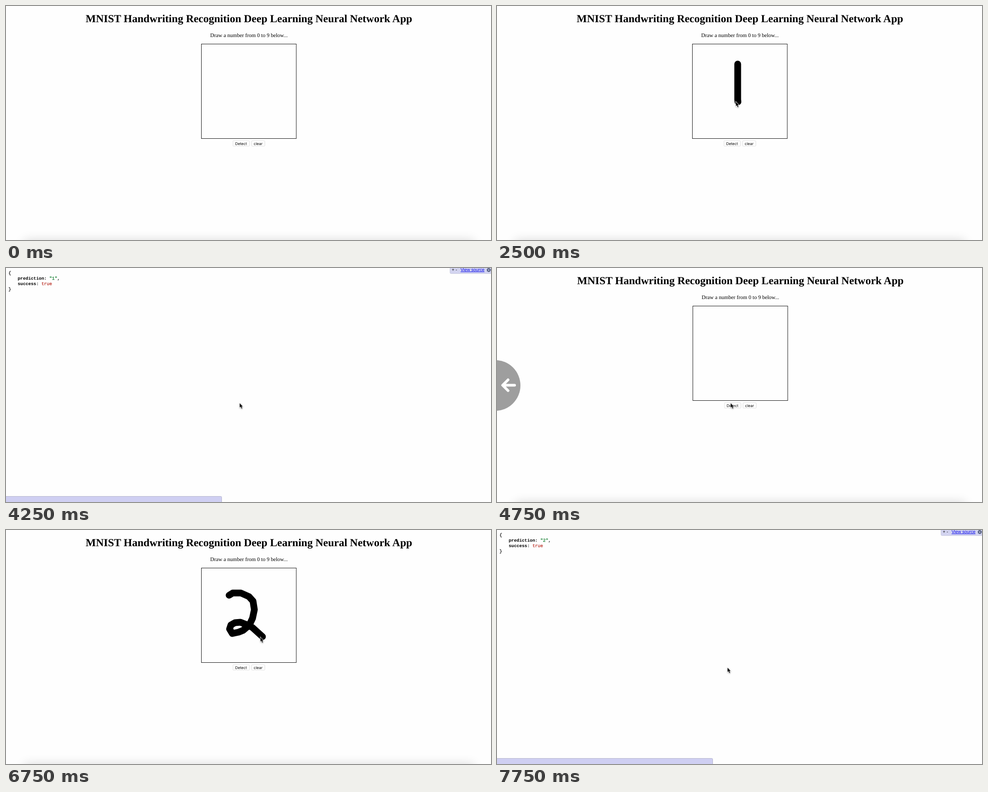
Recreate the animation shown at these times as an HTML page. Size 1076 by 520 pixels, loop 8 s.

```html
<!DOCTYPE html>
<html lang="en">
<head>
<meta charset="utf-8">
<title>Handwriting recognition demo</title>
<style>
html, body { margin: 0; width: 100%; height: 100%; overflow: hidden; background: #fefefe; }
svg { display: block; width: 1076px; height: 520px; }
text { white-space: pre; text-rendering: geometricPrecision; }

.serif { font-family: "Liberation Serif", "Times New Roman", serif; text-anchor: middle; }
.title { font-size: 24px; font-weight: bold; }
.hint { font-size: 12px; }
.label { font: 8.4px Inter, sans-serif; text-anchor: middle; }
.button { fill: #fff; stroke: #e2e2e2; stroke-width: .8; filter: drop-shadow(0 .6px .4px rgba(0, 0, 0, .22)); }
.json { font: bold 9.75px "Liberation Mono", "Courier New", monospace; }
.brace { font-weight: normal; stroke: #000; stroke-width: .25px; }
.string { fill: #0c7a2a; stroke: #0c7a2a; stroke-width: .25px; font-weight: normal; }
.bool { fill: #b92a20; stroke: #b92a20; stroke-width: .25px; font-weight: normal; }
.tools { font: 9.75px "Liberation Sans", Arial, sans-serif; }
.link { fill: #00e; text-decoration: underline; }
.ink { fill: none; stroke: #000; stroke-width: 15px; stroke-linecap: round; stroke-linejoin: round; }
.cursor { stroke: #fff; stroke-width: 1.6px; paint-order: stroke; filter: drop-shadow(0 1px .8px rgba(0, 0, 0, .3)); }

/* One slot is 250 ms = 3.125 % of the loop */
.page, .result, .first, .second, .toolbar, .back, .one, .two, .cursor {
  animation-duration: 8s;
  animation-timing-function: step-end;
  animation-iteration-count: infinite;
}
.page { animation-name: page; }
.result { animation-name: result; }
.first { animation-name: first; }
.second { animation-name: second; }
.toolbar { animation-name: toolbar; }
.back { animation-name: back; }
.one { animation-name: one; stroke-dasharray: 111 200; }
.two { animation-name: two; stroke-dasharray: 263 400; }
.cursor { animation-name: cursor; }

@keyframes page {
  0%, 62.5% { visibility: visible; transform: none; }
  50%, 93.75%, 100% { visibility: hidden; transform: none; }
  59.375% { visibility: visible; transform: translateX(1px); }
}
@keyframes result {
  0%, 59.375% { visibility: hidden; }
  50%, 93.75%, 100% { visibility: visible; }
}
@keyframes first {
  0%, 59.375%, 100% { visibility: hidden; }
  50% { visibility: visible; }
}
@keyframes second {
  0% { visibility: hidden; }
  93.75%, 100% { visibility: visible; }
}
@keyframes toolbar {
  0%, 59.375% { visibility: hidden; }
  53.125%, 96.875%, 100% { visibility: visible; }
}
@keyframes back {
  0%, 62.5%, 100% { visibility: hidden; }
  59.375% { visibility: visible; }
}
@keyframes one {
  0% { visibility: hidden; stroke-dashoffset: 110; }
  25% { visibility: visible; stroke-dashoffset: 110; }
  28.125% { visibility: visible; stroke-dashoffset: 66; }
  31.25% { visibility: visible; stroke-dashoffset: 27; }
  34.375% { visibility: visible; stroke-dashoffset: 0; }
  50%, 100% { visibility: hidden; stroke-dashoffset: 110; }
}
@keyframes two {
  0% { visibility: hidden; stroke-dashoffset: 262; }
  75% { visibility: visible; stroke-dashoffset: 236; }
  78.125% { visibility: visible; stroke-dashoffset: 164; }
  81.25% { visibility: visible; stroke-dashoffset: 92; }
  84.375% { visibility: visible; stroke-dashoffset: 0; }
  93.75%, 100% { visibility: hidden; stroke-dashoffset: 0; }
}
@keyframes cursor {
  0% { transform: translate(-40px, -40px); }
  6.25% { transform: translate(523.5px, 132.5px); }
  9.375% { transform: translate(525px, 150px); }
  12.5% { transform: translate(527.5px, 176px); }
  15.625% { transform: translate(530.5px, 201px); }
  18.75% { transform: translate(533px, 220.5px); }
  21.875% { transform: translate(530px, 150px); }
  25% { transform: translate(529.5px, 130px); }
  28.125% { transform: translate(529.5px, 174px); }
  31.25% { transform: translate(530px, 213px); }
  34.375% { transform: translate(531.5px, 239.5px); }
  37.5% { transform: translate(530px, 254px); }
  40.625% { transform: translate(525px, 275px); }
  43.75% { transform: translate(520.5px, 293px); }
  46.875%, 62.5% { transform: translate(518.5px, 300.5px); }
  65.625% { transform: translate(511px, 252px); }
  68.75% { transform: translate(500px, 192px); }
  71.875% { transform: translate(491px, 147.5px); }
  75% { transform: translate(516px, 141.5px); }
  78.125% { transform: translate(542.5px, 197.5px); }
  81.25% { transform: translate(491.5px, 221px); }
  84.375% { transform: translate(564.5px, 238.5px); }
  87.5% { transform: translate(565.5px, 244px); }
  90.625%, 100% { transform: translate(511.5px, 306px); }
}
</style>
</head>
<body>
<svg viewBox="0 0 1076 520">
  <defs>
    <filter id="soft" filterUnits="userSpaceOnUse" x="-20" y="460" width="1116" height="140">
      <feGaussianBlur stdDeviation="11"/>
    </filter>
    <rect id="shade" x="40" y="520" width="998" height="50" filter="url(#soft)"/>
  </defs>
  <rect width="1076" height="520" fill="#fefefe"/>

  <g class="page">
    <use href="#shade" opacity=".14"/>
    <text class="serif title" x="539" y="36">MNIST Handwriting Recognition Deep Learning Neural Network App</text>
    <text class="serif hint" x="539" y="69">Draw a number from 0 to 9 below...</text>
    <rect x="433.5" y="84.5" width="210.5" height="210" fill="#fefefe" stroke="#111"/>
    <rect class="button" x="503.5" y="299.5" width="36.5" height="12" rx="2"/>
    <rect class="button" x="545" y="299.5" width="29" height="12" rx="2"/>
    <text class="label" x="521.5" y="309">Detect</text>
    <text class="label" x="559.3" y="309">clear</text>
  </g>
  <polyline class="ink one" points="534,129 534,208 536,224 536,239"/>
  <polyline class="ink two" points="495,145 503,140 521,140 539,148 548,158 551,177 547,196 540,211 526,223 516,227 502,230 496,220 499,211 508,206 520,205 538,212 547,217 569,237"/>

  <g class="back">
    <circle cx="-4.5" cy="261" r="56.5" fill="#9e9e9e"/>
    <path d="M39 260.5H13M24.5 248.5L12.5 260.5L24.5 272.5" fill="none" stroke="#fff" stroke-width="6" stroke-linecap="round" stroke-linejoin="round"/>
  </g>

  <g class="result">
    <g class="json">
      <text class="brace" x="5.5" y="13.5">{</text>
      <text x="26" y="25.7">prediction: <tspan class="string">"<tspan class="first">1</tspan><tspan class="second" dx="-5.85">2</tspan>"</tspan>,</text>
      <text x="26" y="38">success: <tspan class="bool">true</tspan></text>
      <text class="brace" x="5.5" y="50">}</text>
    </g>
    <path d="M-1 507.5H476.5Q478.500 507.5 478.500 509.5V521H-1Z" fill="#cfcff2" stroke="#b4b4cc"/>
    <use href="#shade" opacity=".07"/>
  </g>
  <g class="toolbar">
    <path d="M985 -1V10Q985 12.5 987.5 12.5H1077V-1Z" fill="#d3d4f0" stroke="#c3c4da" stroke-width=".8"/>
    <g class="tools">
      <text x="989" y="7.3">+ -</text>
      <text class="link" x="1008.5" y="7">View source</text>
    </g>
    <g fill="none" stroke="#4c5878">
      <circle cx="1071" cy="4.5" r="2.6" stroke-width="2"/>
      <circle cx="1071" cy="4.5" r="4" stroke-width="1.4" stroke-dasharray="1.57 1.57"/>
    </g>
  </g>

  <path class="cursor" d="M0 0V9.6L2.2 7.6L4 12L5.7 11.3L4 7.2H6.8Z"/>
</svg>
</body>
</html>
```
